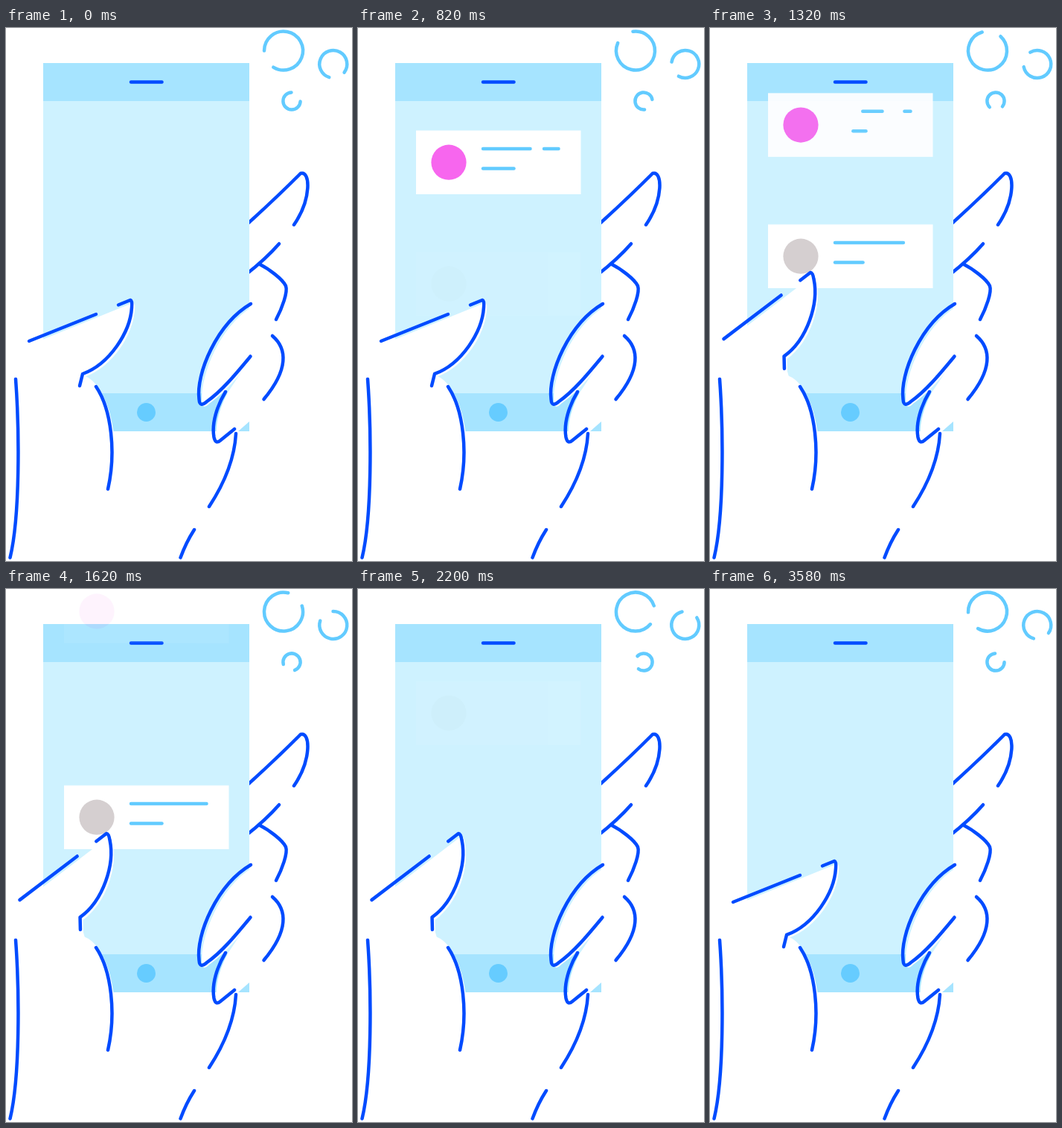
Animation, 465 px wide and 715 px high, one loop 3.6 s. Source, as an HTML page:

```html
<!DOCTYPE html>
<html lang="en">
<head>
<meta charset="utf-8">
<title>Swiping cards</title>
<style>
  html, body { margin: 0; width: 100%; height: 100%; overflow: hidden; background: #fff; }
  svg { display: block; width: 100vw; height: 100vh; }
  .ink, .sky { fill: none; stroke-width: 4.5; stroke-linecap: round; stroke-linejoin: round; }
  .ink { stroke: #004bff; }
  .sky { stroke: #62cbff; }
  .paper { fill: #fff; }
</style>
</head>
<body>
<svg viewBox="0 0 465 715">
  <rect class="paper" width="465" height="715"/>
  <g id="rings" class="sky"></g>

  <!-- fingers behind the phone -->
  <g class="ink">
    <path d="M322 265Q362 229 396 195C409 191 411 229 387 264"/>
    <path d="M367 289.500Q349 310 322 331"/>
    <path d="M341 317C353 323 372 337 376 346C379 354 371 376 363 391"/>
    <path d="M358 413C378 430 380 458 346.500 498"/>
  </g>

  <!-- phone -->
  <rect x="50" y="47" width="277" height="494" fill="#cef2ff"/>
  <path d="M50 47H327V98H50ZM50 490H327V541H50Z" fill="#a6e4ff"/>
  <circle cx="188.500" cy="515.500" r="12.500" fill="#66ccff"/>
  <path class="ink" d="M168 72.500H209.500"/>

  <g id="cards"></g>

  <!-- hand in front of the phone -->
  <g class="paper">
    <path d="M40 466H104Q116 470 125 484C146 515 152 573 141 622H40Z"/>
    <path d="M298 489C288 507 281 530 283 547L287 560L312 541L328 527V444Z"/>
    <path d="M332 373C286 401 262 466 263 500C263 510 268 509 273 504C293 490 313 467 332 443Z"/>
    <path id="thumbFill" d="M31 420L167 365Q170 366 169 375C167 408 139 451 103 464L99 480V495H36Z"/>
  </g>
  <g class="ink">
    <path d="M329 370C283 397 255 464 259.500 498C260 507 264 506 270 501C290 487 309 464 328.500 440.500"/>
    <path d="M295 488C284 506 276 530 279.500 549C281 556 284 557 289 552.500L307 538"/>
    <path d="M309 544C307 580 292 613 273 642M253 673Q242 690 234.500 710.500"/>
    <path d="M13 471C18 540 19 655 5.500 710.500"/>
    <path d="M121 481C142 512 148 570 137 618.500"/>
    <path id="thumb" d="M31 420L121 384M151 371.500L167 365Q170 366 169 375C167 408 139 451 103 464L99 480"/>
  </g>
</svg>
<script>
const LOOP = 3600, STEP = 20, SWIPE = 400;
const $ = id => document.getElementById(id);

function add(parent, tag, attrs = {}) {
  const el = document.createElementNS('http://www.w3.org/2000/svg', tag);
  for (const k in attrs) el.setAttribute(k, attrs[k]);
  parent.appendChild(el);
  return el;
}

const span = (t, from, length) => Math.min(1, Math.max(0, (t - from) / length));
const quad = p => p < .5 ? 2 * p * p : 1 - 2 * (1 - p) ** 2;
const cubic = p => p < .5 ? 4 * p ** 3 : 1 - 4 * (1 - p) ** 3;

// An open ring whose gap is centred on the given angle
function makeRing(x, y, r, angle) {
  const half = (13.5 + r / 2) / r / 2;
  const dx = r * Math.cos(half), dy = r * Math.sin(half);
  const el = add($('rings'), 'path', { d: `M${dx} ${dy}A${r} ${r} 0 1 1 ${dx} ${-dy}` });
  return t => el.setAttribute('transform',
    `translate(${x} ${y}) rotate(${angle + 360 * t / LOOP})`);
}

// A card slides in with a swipe, then floats up and fades
function makeCard({ top, color, enter, leave, rise, split }) {
  const el = add($('cards'), 'g');
  add(el, 'rect', { x: 78, width: 221.5, height: 85.5, fill: '#fff' });
  add(el, 'circle', { cx: 122, cy: 42.7, r: 23.6, fill: color });

  const first = split ? [[168, 231.5], [250, 269.5]] : [[168, 269.5]];
  const lines = first.map(([from, to]) => ({ from, to, y: 24.5 }));
  lines.push({ from: 168, to: 209.5, y: 51 });
  for (const line of lines) line.el = add(el, 'path', { class: 'sky' });

  return t => {
    const shown = span(t, enter, SWIPE);
    const y = top + 37 * (1 - cubic(shown)) - rise * span(t, leave, 580) ** 1.43;
    el.setAttribute('transform', `translate(0 ${y})`);
    el.setAttribute('opacity', shown * (1 - span(t, leave + 232, 353)));

    const head = quad(span(t, enter + 160, 460));
    const tail = quad(span(t, leave + 20, 440));
    for (const { el, from, to, y } of lines) {
      const at = p => from + (to - from) * p;
      el.setAttribute('d', head > tail ? `M${at(tail)} ${y}H${at(head)}` : '');
    }
  };
}

function drawThumb(t) {
  const move = start => cubic(span(t, start, SWIPE));
  const up = move(0) - move(400) + move(800) - move(3200);
  const turn = `rotate(${-15.4 * up} 14 465)`;
  $('thumb').setAttribute('transform', turn);
  $('thumbFill').setAttribute('transform', `translate(4 3.5) ${turn}`);
}

const parts = [
  makeRing(373, 30.5, 26, 151),
  makeRing(439.8, 48.5, 18.5, 72),
  makeRing(384, 98, 11.6, 315),
  makeCard({ top: 137.5, color: '#f766ee', enter: 0, leave: 1060, rise: 158, split: true }),
  makeCard({ top: 263.5, color: '#d5cfd0', enter: 800, leave: 1640, rise: 147 }),
  drawThumb
];

function tick() {
  const t = Math.floor(performance.now() % LOOP / STEP) * STEP;
  for (const draw of parts) draw(t);
  requestAnimationFrame(tick);
}
tick();
</script>
</body>
</html>
```
